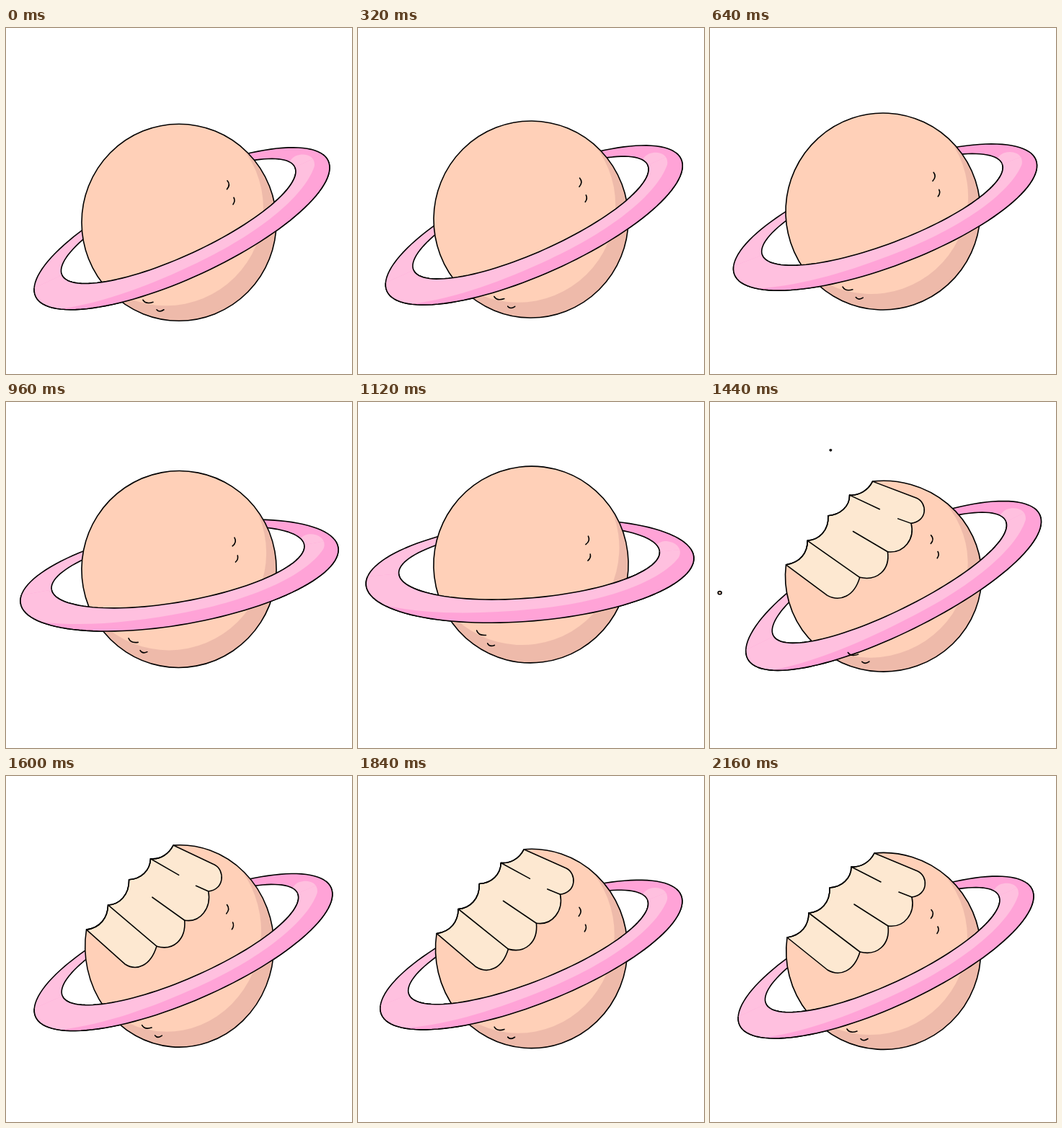
Animation, 480 px wide and 480 px high, one loop 3080 ms. Source, as an HTML page with a canvas:

```html
<!DOCTYPE html>
<html lang="en">
<head>
<meta charset="utf-8">
<title>Bitten planet</title>
<style>
  html, body { margin: 0; width: 100%; height: 100%; overflow: hidden; background: #fff; }
  canvas { display: block; width: 480px; height: 480px; }
</style>
</head>
<body>
<canvas id="stage" width="480" height="480"></canvas>
<script>
const ctx = document.getElementById('stage').getContext('2d');
const LOOP = 3080, STEP = 40, END = 2160, BITE = 1160, CRUMB_LIFE = 320;
const SKIN = '#ffd0b8', SHADE = '#eebaaa', FLESH = '#fde8d1';
const PINK = '#ffa3d7', LIGHT = '#ffc0df';
const RAD = Math.PI / 180, TILT = 24.86;
const CX = 240, CY = 243.5, RX = 135, RY = 136.5;

// time, planet: y, turn, scale x, scale y; ring: dx, dy, turn, scale, bend
const KEYS = [
  [0, 269.75, 0, 1, 1, 4, 8.5, 0, 1, 0],
  [320, 265.5, 0.6, 1, 1, 4.2, 8, 0.7, 1, 0],
  [640, 254.5, 3.2, 1, 1, 3, 8, 4.1, 1, 0],
  [960, 232, 11.2, 1, 1, 0.5, 8.5, 14.8, 1, 0],
  [1120, 225.5, 14.5, 1, 1, -1.5, 9, 20, 1.02, 0],
  [1240, 256, -5.5, 1.075, 0.875, 27, 26, -4, 1.02, -13],
  [1280, 253, -4.9, 1.067, 0.886, 24, 23.5, -3.6, 1.02, -11],
  [1600, 236.5, 1.5, 0.97, 1.027, 6, 8, 1.3, 1, 0],
  [1720, 238.3, 1.2, 0.979, 1.019, -0.5, 8, 4, 1, 0],
  [2160, 243.5, 0, 1, 1, 4, 8, 0, 1, 0]
];

// start x, y, end x, y, radii
const CRUMBS = [
  [190, 120, 167, 66, 5.3, 4.4],
  [110, 245, 12, 265, 10.5, 8.7]
];

function slope(i, c) {
  if (i < 1 || i > KEYS.length - 2) return 0;
  const [a, b, d] = [KEYS[i - 1], KEYS[i], KEYS[i + 1]];
  const m = (b[c] - a[c]) / (b[0] - a[0]);
  const n = (d[c] - b[c]) / (d[0] - b[0]);
  return m * n > 0 ? 2 * m * n / (m + n) : 0;
}

// monotone cubic through the key poses
function poseAt(t) {
  let i = 0;
  while (i < KEYS.length - 2 && t >= KEYS[i + 1][0]) i++;
  const a = KEYS[i], b = KEYS[i + 1], span = b[0] - a[0];
  const p = (t - a[0]) / span, q = 1 - p;
  return a.slice(1).map((v, k) => {
    const c = k + 1;
    return v * (1 + 2 * p) * q * q + b[c] * p * p * (3 - 2 * p)
      + span * (slope(i, c) * p * q * q - slope(i + 1, c) * p * p * q);
  });
}

const body = new Path2D();
body.ellipse(CX, CY, RX, RY, 0, 0, Math.PI * 2);

const bitten = new Path2D();
const bittenEdge = 'C127 221 137 207 137 190 C153 189 167 176 166 155 '
  + 'C183 154 196 142 196 126 C210 127 222 119 228 107';
bitten.ellipse(CX, CY, RX, RY, 0, -95.1 * RAD, 188.3 * RAD);
bitten.addPath(new Path2D('M107 224' + bittenEdge + 'Z'));
const bittenShape = new Path2D('M228 107 A135 136.5 0 1 1 107 224' + bittenEdge + 'Z');

const flesh = new Path2D('M107 224' + bittenEdge
  + 'L288 132 C303 139 303 165 280 168 C285 190 270 211 247 208 '
  + 'C250 234 232 250 208 244 C200 271 180 279 163 269 Z');
const grooves = new Path2D('M137 190L208 244M200 178L247 208M196 126L237 147M262 161L280 168');
const marks = new Path2D('M307 185.5Q312 191 306.5 197.5M316 209Q318.5 213.5 315 218.5'
  + 'M190 351Q194 357.5 204 354M209 364.5Q213 369 219 364.5');
const lit = new Path2D();
lit.ellipse(222, 224, 135, 135, 0, 0, Math.PI * 2);

function drawPlanet([y, turn, sx, sy], isBitten) {
  const shape = isBitten ? bittenShape : body;
  ctx.save();
  placePlanet(y, turn, sx, sy);
  ctx.save();
  ctx.clip(shape);
  ctx.fillStyle = SHADE;
  ctx.fillRect(90, 90, 300, 300);
  ctx.fillStyle = SKIN;
  ctx.fill(lit);
  ctx.restore();
  if (isBitten) {
    ctx.fillStyle = FLESH;
    ctx.fill(flesh);
    ctx.stroke(flesh);
    ctx.stroke(grooves);
  }
  ctx.stroke(shape);
  ctx.restore();
}

function placePlanet(y, turn, sx, sy) {
  ctx.translate(CX, y);
  ctx.rotate(turn * RAD);
  ctx.scale(sx, sy);
  ctx.translate(-CX, -CY);
}

function drawMarks([y, turn, sx, sy]) {
  ctx.save();
  placePlanet(y, turn, sx, sy);
  ctx.stroke(marks);
  ctx.restore();
}

function drawRing([y, , , , dx, dy, turn, size, bend], frontOnly) {
  const bow = (u, v) => [u, v + bend * (1 - (u / 224) ** 2)];
  const ring = new Path2D();
  const addOval = (cv, a, b) => {
    for (let i = 0; i < 120; i++) {
      const k = i * 3 * RAD;
      const p = bow(a * Math.cos(k), cv + b * Math.sin(k));
      i ? ring.lineTo(...p) : ring.moveTo(...p);
    }
    ring.closePath();
  };
  addOval(0, 223.7, 68);
  addOval(-11.4, 178, 48);

  const glow = new Path2D();
  const curve = (...n) => glow.bezierCurveTo(
    ...bow(n[0], n[1]), ...bow(n[2], n[3]), ...bow(n[4], n[5]));
  glow.moveTo(-240, 15);
  glow.lineTo(...bow(-197, 31));
  curve(-140, 48, -70, 53, 0, 52);
  curve(90, 51, 172, 32, 203, -1);
  curve(211, -13, 200, -24, 186, -25);
  curve(178, -25, 172, -20, 168, -14);
  glow.lineTo(100, 0);
  glow.lineTo(-100, -90);
  glow.lineTo(-240, -90);
  glow.closePath();

  ctx.save();
  ctx.translate(CX + dx, y + dy);
  ctx.rotate((turn - TILT) * RAD);
  ctx.scale(size, size);
  if (frontOnly) {
    ctx.beginPath();
    ctx.rect(-240, -11.4, 480, 120);
    ctx.clip();
  }
  ctx.fillStyle = PINK;
  ctx.fill(ring, 'evenodd');
  ctx.save();
  ctx.clip(ring, 'evenodd');
  ctx.fillStyle = LIGHT;
  ctx.fill(glow);
  ctx.restore();
  ctx.stroke(ring);
  ctx.restore();
}

function drawCrumbs(t) {
  const p = (t - BITE) / CRUMB_LIFE;
  if (p < 0 || p >= 1) return;
  const go = 1 - (1 - p) ** 2, size = 1 - p * p;
  ctx.fillStyle = SKIN;
  for (const [x0, y0, x1, y1, rx, ry] of CRUMBS) {
    ctx.beginPath();
    ctx.ellipse(x0 + (x1 - x0) * go, y0 + (y1 - y0) * go, rx * size, ry * size, 0, 0, Math.PI * 2);
    ctx.fill();
    ctx.stroke();
  }
}

function draw(t) {
  const pose = poseAt(t);
  ctx.fillStyle = '#fff';
  ctx.fillRect(0, 0, 480, 480);
  ctx.strokeStyle = '#000';
  ctx.lineWidth = 1.6;
  ctx.lineCap = ctx.lineJoin = 'round';
  drawRing(pose, false);
  drawPlanet(pose, t >= BITE);
  drawRing(pose, true);
  drawMarks(pose);
  drawCrumbs(t);
}

const start = performance.now();
function tick() {
  const t = (performance.now() - start) % LOOP;
  draw(Math.min(END, Math.floor(t / STEP) * STEP));
  requestAnimationFrame(tick);
}
tick();
</script>
</body>
</html>
```
